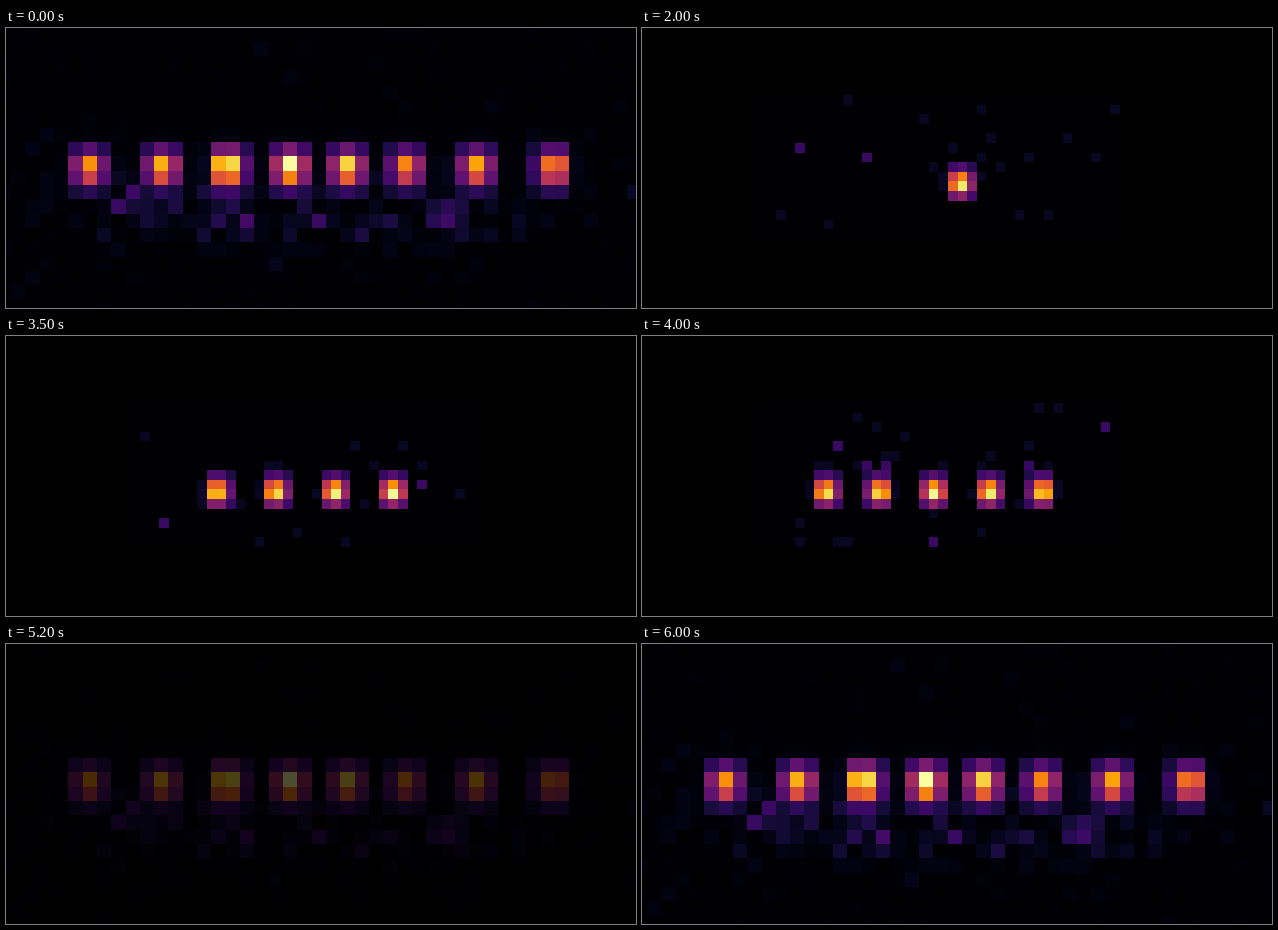
Recreate the animation shown at these times as a matplotlib script. Size 630 by 280 pixels, loop 9000 ms.

```python
import numpy as np
import matplotlib.pyplot as plt
from matplotlib.animation import FuncAnimation

WIDTH, HEIGHT, DPI = 630, 280, 100
STEP_MS, LOOP_MS = 100, 9000
WIDE_END = 1000
CHAIN_START, CHAIN_STEP, MAX_IONS = 2000, 500, 5
FADE_START, FADE_END = 5000, 6000

inferno = plt.get_cmap("inferno")


class Sensor:
    """Grid of square camera pixels placed on the stage."""

    def __init__(self, first, cols, rows, left, top, pitch):
        self.col, self.row = np.meshgrid(first + np.arange(cols),
                                         np.arange(rows))
        self.extent = (left, left + cols * pitch, top + rows * pitch, top)

    def glow(self, ions, y, wx, wy):
        """Brightest contribution of all ions, given as (x, peak) pairs."""
        image = np.zeros(self.col.shape)
        for x, peak in ions:
            dx, dy = self.col - x, self.row - y
            light = peak / (1 + (dx / wx) ** 2 + (dy / wy) ** 2) ** 2
            outside = (abs(dx) > 1.5) | (abs(dy) > 2)
            image = np.maximum(image, light * np.where(outside, 0.25, 1))
        return image

    def show(self, ax):
        return ax.imshow(np.zeros((*self.col.shape, 3)), extent=self.extent,
                         interpolation="nearest", aspect="auto",
                         visible=False)


def colours(image):
    return inferno(np.clip(image, 0, 1))[..., :3]


def wide_view(sensor):
    centres = (4.95, 10.1, 14.55, 19, 23, 27.15, 32, 37.45)
    peaks = (0.82, 0.90, 1.20, 1.10, 0.97, 0.81, 0.87, 0.90)
    image = sensor.glow(zip(centres, peaks), y=9.3, wx=1.35, wy=1.45)

    # Stray light gathers in a band just below the ions.
    band = np.exp(-((sensor.row - 12.5) / 2.2) ** 2
                  - ((sensor.col - 19) / 17) ** 4)
    rng = np.random.default_rng(12)
    haze = rng.gamma(1.5, 0.006 + 0.035 * band) - 0.008
    return np.maximum(image, haze)


def chain_view(sensor, count):
    middle = 20.75 - 0.67 * (count - 1)
    spacing = 10 * count ** -0.35
    ions = [(middle + (i - (count - 1) / 2) * spacing, 1.05)
            for i in range(count)]
    image = sensor.glow(ions, y=8.7, wx=1.6, wy=1.65)
    image[image < 0.05] = 0

    # Single stray photons, more likely around and above the ions.
    halo = sensor.glow(ions, y=7, wx=2.5, wy=3)
    rng = np.random.default_rng(count)
    hit = rng.random(image.shape) < 0.03 + 0.35 * halo
    level = np.where(rng.random(image.shape) < 0.15, 0.18, 0.06)
    return np.maximum(image, hit * level)


wide = Sensor(first=-1, cols=45, rows=20, left=-9.3, top=-0.5, pitch=14.32)
close = Sensor(first=0, cols=38, rows=15, left=115.4, top=68, pitch=9.55)

wide_rgb = colours(wide_view(wide))
chains_rgb = [colours(chain_view(close, n)) for n in range(1, MAX_IONS + 1)]

fig = plt.figure(figsize=(WIDTH / DPI, HEIGHT / DPI), dpi=DPI,
                 facecolor="black")
ax = fig.add_axes([0, 0, 1, 1])
wide_art, close_art = wide.show(ax), close.show(ax)
ax.set_xlim(0, WIDTH)
ax.set_ylim(HEIGHT, 0)
ax.axis("off")


def wide_brightness(ms):
    if ms < WIDE_END or ms >= FADE_END:
        return 1
    if ms < FADE_START:
        return 0
    return (ms - FADE_START + STEP_MS) / (FADE_END - FADE_START)


def update(frame):
    ms = frame * STEP_MS
    brightness = wide_brightness(ms)
    wide_art.set_visible(brightness > 0)
    wide_art.set_data(wide_rgb * brightness)

    chain = (ms - CHAIN_START) // CHAIN_STEP
    has_chain = 0 <= chain < MAX_IONS
    close_art.set_visible(has_chain)
    if has_chain:
        close_art.set_data(chains_rgb[chain])
    return wide_art, close_art


anim = FuncAnimation(fig, update, frames=LOOP_MS // STEP_MS,
                     interval=STEP_MS, repeat=True, repeat_delay=0)
plt.show()
```
